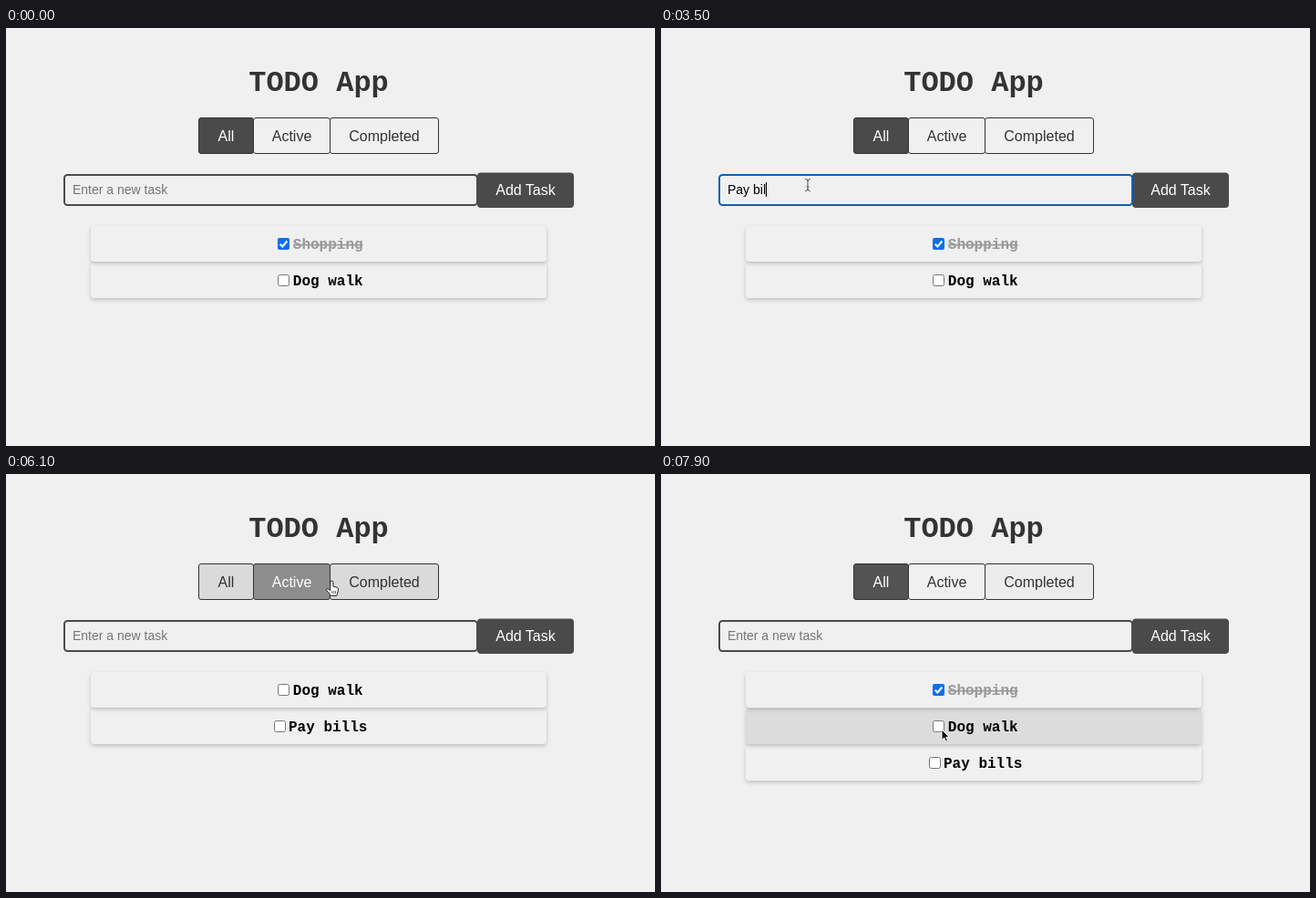
An HTML page for the animation above (8 s loop, 712 px wide and 458 px high).

```html
<!DOCTYPE html>
<html lang="en">
<head>
<meta charset="utf-8">
<title>TODO App</title>
<style>
html, body { margin: 0; width: 100%; height: 100%; overflow: hidden; background: #f0f0f0; }
svg { display: block; }
text { font: 16px "Liberation Sans", Arial, sans-serif; white-space: pre; }
.mono { font: bold 16px "Courier New", "Liberation Mono", monospace; }
.title { font-size: 32px; fill: #333; }
.field { font-size: 14px; }
.done { fill: #999; text-decoration: line-through; }
.row { filter: drop-shadow(0 2px 2px rgba(0, 0, 0, .2)); }
</style>
</head>
<body>
<svg id="stage" width="712" height="458" viewBox="0 0 712 458"></svg>
<script>
const LOOP = 8000, STEP = 100;
const FOCUS = 1100, ENTER = 4500, ACTIVE = 5800, COMPLETED = 6500, ALL = 7300;
const TASK = 'Pay bills';
const FILTERS = ['All', 'Active', 'Completed'], EDGES = [211, 271, 355, 474];

// typing speeds up from 2.0 s to 3.6 s
const KEYS = Array.from(TASK, (_, i) => 3600 - 1600 * (1 - i / 8) ** 1.5);

// the pointer reaches each stop [time, x, y] by a straight move
const APPEAR = 200, MOVE = 300;
const STOPS = [
  [200, 240, 400], [500, 203, 290], [800, 161, 172], [4700, 272, 150], [5500, 331, 116],
  [6300, 410, 119], [7100, 244, 114], [7700, 308, 280]
];

const stage = document.getElementById('stage');
const ruler = document.createElement('canvas').getContext('2d');
ruler.font = '14px "Liberation Sans", Arial, sans-serif';

const clamp = v => Math.min(1, Math.max(0, v));
const inside = (m, x, y, w, h) => m[0] >= x && m[0] < x + w && m[1] >= y && m[1] < y + h;
const rect = (x, y, w, h, r, attrs) => `<rect x="${x}" y="${y}" width="${w}" height="${h}" rx="${r}" ${attrs}/>`;
const text = (x, y, s, attrs = '') => `<text x="${x}" y="${y}" ${attrs}>${s}</text>`;
const selected = t => t < ACTIVE || t >= ALL ? 'All' : t < COMPLETED ? 'Active' : 'Completed';

function mouse(t) {
  return STOPS.reduce((pos, [at, ...to]) => {
    const p = clamp((t - at + MOVE) / MOVE);
    return pos.map((v, i) => v + (to[i] - v) * p);
  }, STOPS[0].slice(1));
}

// the background eases towards its state, and hover outranks selection
function shade(i, t) {
  let g = i ? 240 : 74;
  for (let s = 0; s <= t; s += STEP) {
    const hover = inside(mouse(s), EDGES[i], 98, EDGES[i + 1] - EDGES[i], 40);
    const goal = hover ? 184 : selected(s) === FILTERS[i] ? 74 : 240;
    g += (goal - g) * .4;
  }
  return Math.round(g);
}

function filterButton(name, i, t) {
  const x = EDGES[i], w = EDGES[i + 1] - x, g = shade(i, t);
  return rect(x + .5, 98.5, w, 39, 2.5, `fill="rgb(${g},${g},${g})" stroke="#333"`) +
    text(x + w / 2 + .5, 124, name, `text-anchor="middle" fill="${selected(t) === name ? '#fff' : '#333'}"`);
}

function taskRow(task, i, m) {
  const y = 217 + i * 40, x = 353.2 - task.name.length * 4.8, bx = Math.round(x - 16.4);
  const hover = m && inside(m, 93, y, 500, 40);
  const box = task.done
    ? rect(bx, y + 13, 13, 13, 2, 'fill="#0b70ea"') +
      `<path d="M${bx + 2.7} ${y + 19.7}l2.7 2.8 5-6" fill="none" stroke="#fff" stroke-width="2"/>`
    : rect(bx + .5, y + 13.5, 12, 12, 2, 'fill="#fff" stroke="#767676"');
  return rect(93, y, 500, 39, 4, `class="row" fill="${hover ? '#dcdcdc' : '#f0f0f0'}"`) +
    box + text(x, y + 25, task.name, `class="mono ${task.done ? 'done' : ''}"`);
}

function field(t) {
  const focused = t >= FOCUS && t < ACTIVE;
  const pressed = KEYS.filter(k => k <= t);
  const typed = t < ENTER ? TASK.slice(0, pressed.length) : '';
  // the caret restarts its blink at every key
  const start = t >= ENTER ? ENTER - 500 : Math.max(FOCUS + STEP, ...pressed);
  const caret = focused && (t - start) % 1000 < 500;
  const x = Math.floor(73 + ruler.measureText(typed).width) + .5;
  return rect(64, 161, 453, 33, 3.5, `fill="#f0f0f0" stroke="${focused ? '#0f60b2' : '#4a4a4a'}" stroke-width="2"`) +
    text(73, 182, typed || 'Enter a new task', `class="field" fill="${typed ? '#000' : '#757575'}"`) +
    (caret ? `<path d="M${x} 169v16" stroke="#000"/>` : '');
}

function pointer(m) {
  const onField = inside(m, 63, 159, 454, 37);
  const onButton = inside(m, 211, 98, 264, 40);
  const shape = onField
    ? '<path d="M-3-6.5q3 0 3 2 0-2 3-2M0-5V5M-3 6.5q3 0 3-2 0 2 3 2M-1.5 2h3" fill="none" stroke="#555"/>'
    : onButton
    ? `<path d="M-1.6 1.6a1.6 1.6 0 0 1 3.2 0v4.6l4.2 1q1.6.5 1.4 2.2l-.7 3.6-1 3.4h-6.3l-4.6-5.8q-.9-1.8.9-2l2.9 2z" fill="#fff" stroke="#222"/>
       <path d="M.5 11v3M2.4 11v3M4.2 11v3" stroke="#444" stroke-width=".8"/>`
    : '<path d="M0 0v11.5l2.7-2.4 1.9 4.2 2-.9-1.9-4.1h3.6z" fill="#111" stroke="#fff"/>';
  return `<g transform="translate(${m})" stroke-linejoin="round">${shape}</g>`;
}

function draw(t) {
  const m = t >= APPEAR && mouse(t);
  const view = selected(t);
  const tasks = [{ name: 'Shopping', done: true }, { name: 'Dog walk' }];
  if (t >= ENTER) tasks.push({ name: TASK });
  const shown = tasks.filter(k => view === 'All' || (view === 'Completed') === !!k.done);
  // rows are stacked from the bottom up, so each shadow falls on the next row
  const rows = shown.map((k, i) => taskRow(k, i, m)).reverse();
  stage.innerHTML = text(343, 69, 'TODO App', 'class="mono title" text-anchor="middle"') +
    FILTERS.map((name, i) => filterButton(name, i, t)).join('') +
    rect(517, 158.5, 106, 38.5, 4, 'fill="#4a4a4a"') +
    text(570, 183, 'Add Task', 'text-anchor="middle" fill="#fff"') +
    field(t) + rows.join('') + (m ? pointer(m) : '');
}

let last = -1;
function tick() {
  const t = Math.floor(performance.now() % LOOP / STEP) * STEP;
  if (t !== last) draw(last = t);
  requestAnimationFrame(tick);
}
tick();
</script>
</body>
</html>
```
